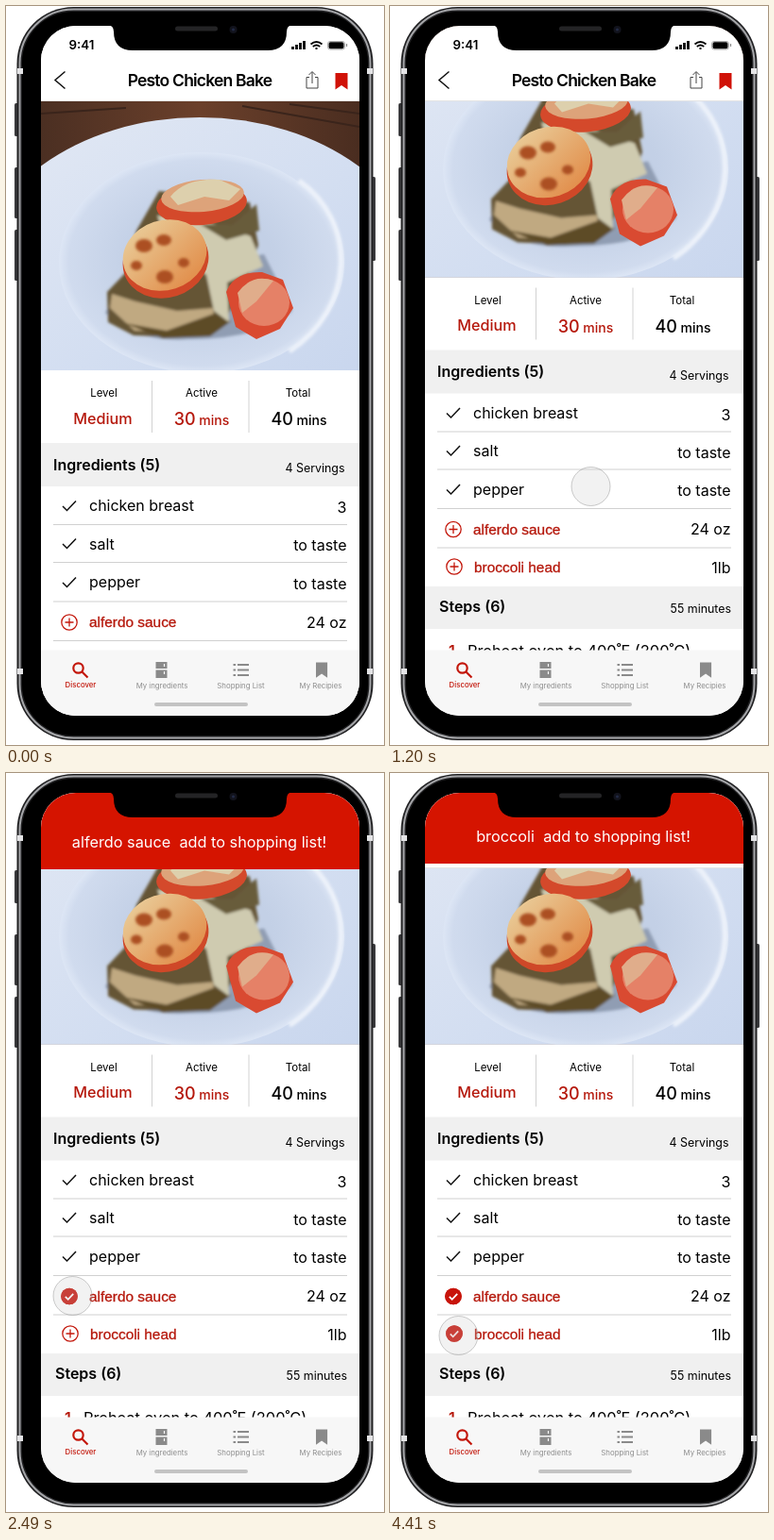
Write an HTML page that moves like this. It is 400x783 px and loops after 4.44 s.

```html
<!DOCTYPE html>
<html lang="en">
<head>
<meta charset="utf-8">
<title>Recipe app</title>
<style>
  html, body { margin: 0; width: 100%; height: 100%; overflow: hidden; background: #fff; }
  svg { display: block; width: 400px; height: 783px; font: 16px Inter, sans-serif; }
  .mid { text-anchor: middle; }
  .end { text-anchor: end; }
  .red { fill: #b5170b; }
  .head { font-weight: 600; }
  .small { font-size: 12.4px; }
  .label { font-size: 11.5px; }
  .item { font: 15.4px "Liberation Sans", Arial, sans-serif; fill: #b5170b; stroke: #b5170b; stroke-width: .3; }
  .tab { font-size: 7.8px; fill: #8e8e8e; text-anchor: middle; }
  .line { fill: none; stroke: #111; stroke-width: 1.5; }
</style>
</head>
<body>
<svg viewBox="0 0 400 783">
  <defs>
    <clipPath id="screen"><rect x="37" y="21" width="337" height="731" rx="37"/></clipPath>
    <clipPath id="photo"><rect x="37" y="101" width="337" height="285"/></clipPath>
    <linearGradient id="wood"><stop stop-color="#4b2f22"/><stop offset=".5" stop-color="#6b402b"/><stop offset="1" stop-color="#4a2d20"/></linearGradient>
    <linearGradient id="plate" x2="1" y2="1"><stop stop-color="#e3e9f4"/><stop offset=".5" stop-color="#d3def1"/><stop offset="1" stop-color="#c3d2ec"/></linearGradient>
    <radialGradient id="well"><stop offset=".5" stop-color="#c3d0e6"/><stop offset=".93" stop-color="#d0dbee"/><stop offset="1" stop-color="#dde6f5"/></radialGradient>
    <linearGradient id="melt" x2=".6" y2="1"><stop stop-color="#ead2a0"/><stop offset="1" stop-color="#e2914f"/></linearGradient>
    <filter id="soft" x="-20%" y="-20%" width="140%" height="140%"><feGaussianBlur stdDeviation="1.6"/></filter>
    <path id="mark" d="M0 0h13v17.500l-6.500-4.500-6.500 4.500z"/>
  </defs>

  <!-- phone body -->
  <g fill="#3a3a3c">
    <rect x="9" y="103" width="5" height="35" rx="1.500"/>
    <rect x="9" y="171" width="5" height="54" rx="1.500"/>
    <rect x="9" y="237" width="5" height="54" rx="1.500"/>
    <rect x="386" y="181" width="5" height="89" rx="1.500"/>
  </g>
  <rect x="11.500" y="1" width="377" height="777" rx="60" fill="#202022"/>
  <rect x="14.500" y="3.500" width="371" height="772" rx="57" fill="none" stroke="#a5a6a9" stroke-width="2"/>
  <rect x="17" y="6" width="366" height="767" rx="54"/>
  <path d="M12 69h6M382 69h6M12 705h6M382 705h6" stroke="#e4e4e6" stroke-width="6"/>

  <g clip-path="url(#screen)">
    <rect x="37" y="21" width="337" height="731" fill="#fff"/>
    <g id="page">
      <g clip-path="url(#photo)">
        <rect x="37" y="101" width="337" height="285" fill="url(#wood)"/>
        <path d="M37 114l90-6M250 106l124 22M300 104l74 10" stroke="#3a241b" stroke-width="2"/>
        <ellipse cx="205" cy="291" rx="236" ry="173" fill="url(#plate)"/>
        <ellipse cx="207" cy="272" rx="151" ry="117" fill="url(#well)"/>
        <path d="M310 185C372 228 370 320 300 366" fill="none" stroke="#edf2fa" stroke-width="5" filter="url(#soft)"/>
        <g filter="url(#soft)">
          <path d="M105 325q30 32 90 28q75 0 108-30l-30-60-150 30z" fill="#909db3"/>
          <path d="M107 303l19-20 12-45 24-42 96 12 9 45-14 46-24 36-42 16-52-2-27-14z" fill="#655536"/>
          <path d="M112 305l25 8 44 10 38-3 2 14-35 12-50-2-26-24z" fill="#c0a981"/>
          <path d="M125 336l45 8 50-18 18 8-22 16-50 2z" fill="#5d4b28"/>
          <path d="M160 222l52 6 47 16 13 32-38 17 2 42-16-12-8-38-40-30z" fill="#cfcbb0"/>
          <path d="M205 231l35 1 25-22 3 28-35 10z" fill="#685b3b"/>
        </g>
        <ellipse cx="207" cy="210" rx="48" ry="22" fill="#d4492b" transform="rotate(-5 207 210)"/>
        <ellipse cx="208" cy="201" rx="44" ry="17" fill="#dda37a" transform="rotate(-5 208 201)"/>
        <path d="M174 202q16-20 52-18l22 10-12 12-26-4-28 9z" fill="#ddd0ad"/>
        <ellipse cx="169" cy="270" rx="46" ry="39" fill="#cf4828" transform="rotate(-18 169 270)"/>
        <ellipse cx="168" cy="264" rx="45" ry="37" fill="url(#melt)" transform="rotate(-18 168 264)"/>
        <g fill="#ac4f20" filter="url(#soft)">
          <ellipse cx="146" cy="254" rx="9" ry="7"/><ellipse cx="167" cy="248" rx="8" ry="6"/>
          <ellipse cx="168" cy="287" rx="9" ry="7"/><ellipse cx="188" cy="272" rx="6" ry="5"/>
          <ellipse cx="138" cy="275" rx="6" ry="5"/>
        </g>
        <path d="M233 303q9-22 38-21l22 8 11 30-14 22-25 11-22-13z" fill="#d94a31"/>
        <ellipse cx="273" cy="314" rx="27" ry="25" fill="#e58167"/>
        <path d="M245 304q15-21 38-13l-18 22-15 12z" fill="#e0ad8b"/>
      </g>

      <g class="mid label">
        <text x="103.500" y="414">Level</text><text x="207" y="414">Active</text><text x="309" y="414">Total</text>
      </g>
      <g class="mid" font-size="14" font-weight="500">
        <text class="red" x="102.500" y="442.500" font-size="16.200">Medium</text>
        <text class="red" x="207" y="444"><tspan font-size="18">30</tspan> mins</text>
        <text x="310" y="444"><tspan font-size="18">40</tspan> mins</text>
      </g>
      <path d="M154.500 397v55M257 397v55" stroke="#d2d2d2"/>

      <path d="M37 463h337v46H37zM37 713.500h337v45H37z" fill="#f0f0f0"/>
      <text class="head" x="50" y="491.500">Ingredients (5)</text>
      <text class="end small" x="358.500" y="494">4 Servings</text>
      <path d="M50 549.500h311M50 589.500h311M50 631h311M50 672.500h311" stroke="#d0d0d0"/>
      <path class="line" d="M60 530l4.500 4.500 9.500-10M60 570l4.500 4.500 9.500-10M60 611l4.500 4.500 9.500-10"/>
      <text x="88" y="535">chicken breast</text><text class="end" x="360.500" y="537">3</text>
      <text x="88" y="575.500">salt</text><text class="end" x="360.500" y="577">to taste</text>
      <text x="88" y="616">pepper</text><text class="end" x="360.500" y="617.500">to taste</text>
      <text class="item" x="88" y="658">alferdo sauce</text><text class="end" x="360.500" y="658.500">24 oz</text>
      <text class="item" x="89" y="698">broccoli head</text><text class="end" x="360.500" y="699">1lb</text>
      <g id="icons"></g>

      <text class="head" x="52" y="740">Steps (6)</text>
      <text class="end small" x="361" y="741.500">55 minutes</text>
      <text class="red head" x="62" y="787">1.</text>
      <text x="82" y="787" font-size="16.400">Preheat oven to 400˚F (200˚C)</text>
    </g>
    <g id="flights"></g>

    <!-- status and title -->
    <path d="M37 21h337v79.500H37z" fill="#fff"/>
    <path d="M37 100.500h337" stroke="#e4e4e4"/>
    <text class="head" x="66.500" y="46" font-size="13.300">9:41</text>
    <path d="M303.500 46v-3M307.500 46v-5M311.500 46v-7M315.500 46v-9" stroke="#000" stroke-width="2.800"/>
    <g fill="none" stroke="#000" stroke-width="1.900"><path d="M322.500 40.500q6-5 12 0M324.800 43q3.700-3 7.400 0"/><path d="M327.500 45h2"/></g>
    <rect x="340.500" y="37.500" width="18" height="8.500" rx="2.500" fill="none" stroke="#999" stroke-width=".8"/>
    <rect x="341.500" y="38.300" width="16" height="7" rx="1.800"/><path d="M360.500 40v3" stroke="#888" stroke-width="1.200"/>
    <path class="line" d="M62.500 69.500l-10.500 9 10.500 9" stroke-width="1"/>
    <text class="head mid" x="205" y="84.500" font-size="17.500" letter-spacing="-.8">Pesto Chicken Bake</text>
    <path d="M321 75.500h-3v11.500h12v-11.500h-3M324 82v-12M320.500 73l3.500-3.500 3.500 3.500" fill="none" stroke="#444"/>
    <use href="#mark" x="348.500" y="71" fill="#d01208"/>
    <g id="banners"></g>

    <!-- tab bar -->
    <path d="M37 682.500h337v70H37z" fill="#f7f7f7"/>
    <g fill="none" stroke="#c3170b" stroke-width="2.200"><circle cx="76.500" cy="701.500" r="5.200"/><path d="M80.500 705.500l6 6"/></g>
    <g fill="#8a8a8a">
      <path d="M158.500 695h12v7h-12zM158.500 703.500h12v8.500h-12z"/>
      <use href="#mark" transform="translate(328 695.500) scale(.93)"/>
    </g>
    <path d="M167.500 697v3M167.500 705v3" stroke="#f7f7f7" stroke-width="1.200"/>
    <path d="M240.500 698h2.500M245 698h12M240.500 703.500h2.500M245 703.500h12M240.500 709h2.500M245 709h12" stroke="#8a8a8a" stroke-width="2"/>
    <g class="tab">
      <text x="79" y="722.300" style="fill:#c3170b" font-weight="500">Discover</text>
      <text x="165" y="723.300">My ingredients</text><text x="248.500" y="723.300">Shopping List</text><text x="333" y="723.300">My Recipies</text>
    </g>
    <rect x="157" y="738" width="99" height="4" rx="2" fill="#c3c3c3"/>
    <circle id="touch" r="20.500" stroke="#8c8c8c" stroke-opacity=".45"/>
  </g>

  <!-- notch -->
  <path d="M108 20q6 1 6 7q0 20 20 20h143q20 0 20-20q0-6 6-7z"/>
  <rect x="179" y="21.500" width="45" height="5" rx="2.500" fill="#242426"/>
  <circle cx="240.500" cy="25" r="4" fill="#12131c"/><circle cx="240.500" cy="25" r="1.500" fill="#222a44"/>
</svg>
<script>
const LOOP = 4440, SLIDE = 380, BANNER_TRAVEL = 95, SCROLL = 98.5;
const $ = id => document.getElementById(id);
const clamp = v => Math.min(1, Math.max(0, v));
const easeOut = t => 1 - (1 - clamp(t)) ** 1.8;
const easeInOut = t => (t = clamp(t), t * t * (3 - 2 * t));
const bump = (t, center, half) => easeInOut(1.6 * (1 - Math.abs(t - center) / half));
const move = (el, x, y) => el.setAttribute('transform', `translate(${x} ${y})`);

function add(parent, markup) {
  $(parent).insertAdjacentHTML('beforeend', `<g>${markup}</g>`);
  return $(parent).lastElementChild;
}

const items = [
  { word: 'alferdo', notice: 'alferdo sauce', x: 67, y: 653, enter: 2002, leave: 3738 },
  { word: 'broccoli', notice: 'broccoli', x: 68, y: 692.5, enter: 4112, leave: Infinity },
];
for (const item of items) {
  item.icon = add('icons', `
    <circle r="8.2" fill="#fff" stroke="#c3170b" stroke-width="1.3"/>
    <path d="M-4.500 0h9M0-4.500v9" stroke="#c3170b" stroke-width="1.3"/>
    <circle r="8.8" fill="#c8140a"/>
    <path d="M-4.200 .3l2.900 3 5.500-6" fill="none" stroke="#fff" stroke-width="1.8"/>`);
  move(item.icon, item.x, item.y);
  item.flight = add('flights', `<text class="item">${item.word}</text>`);
  item.banner = add('banners', `<path d="M37 -20h337v122H37z" fill="#d51400"/>
    <text class="mid" x="204.500" y="79" font-size="16.300" fill="#fff">${item.notice}&nbsp; add to shopping list!</text>`);
}

// Finger positions: time, x, y
const path = [
  [640, 222.5, 607.5], [1150, 212.5, 509], [1280, 212.5, 509], [1700, 70.5, 554],
  [2550, 70.5, 554], [3080, 74.5, 599.5], [3500, 72.5, 596],
];

function finger(t) {
  let [, x, y] = path[0];
  for (let i = 1; i < path.length; i++) {
    const [t0, x0, y0] = path[i - 1], [t1, x1, y1] = path[i];
    const p = easeInOut((t - t0) / (t1 - t0));
    x += (x1 - x0) * p;
    y += (y1 - y0) * p;
  }
  return [x, y];
}

function draw(t) {
  move($('page'), 0, -SCROLL * easeInOut((t - 640) / 510));

  for (const { icon, flight, banner, y, enter, leave } of items) {
    const p = easeOut((t - enter) / SLIDE), out = easeOut((t - leave) / SLIDE);
    const [, plus, disc, check] = icon.children;
    disc.style.opacity = clamp(p * 2.7);
    plus.style.opacity = clamp(1 - p * 5.5);
    check.style.opacity = p * p;
    flight.style.display = p > 0 && p < 1 ? '' : 'none';
    move(flight, 88 + 144 * p, y - SCROLL + 5 + 147 * p);
    banner.style.display = p > 0 && out < 1 ? '' : 'none';
    move(banner, 0, BANNER_TRAVEL * (p - 1 - out));
  }

  const press = Math.max(bump(t, 1780, 150), bump(t, 3880, 150));
  const shade = Math.round(200 - 40 * press);
  const touch = $('touch');
  move(touch, ...finger(t));
  touch.setAttribute('fill', `rgba(${shade},${shade},${shade},${0.24 + 0.14 * press})`);
  touch.style.opacity = clamp((t - 500) / 100);
}

function tick() {
  draw(performance.now() % LOOP);
  requestAnimationFrame(tick);
}
tick();
</script>
</body>
</html>
```
